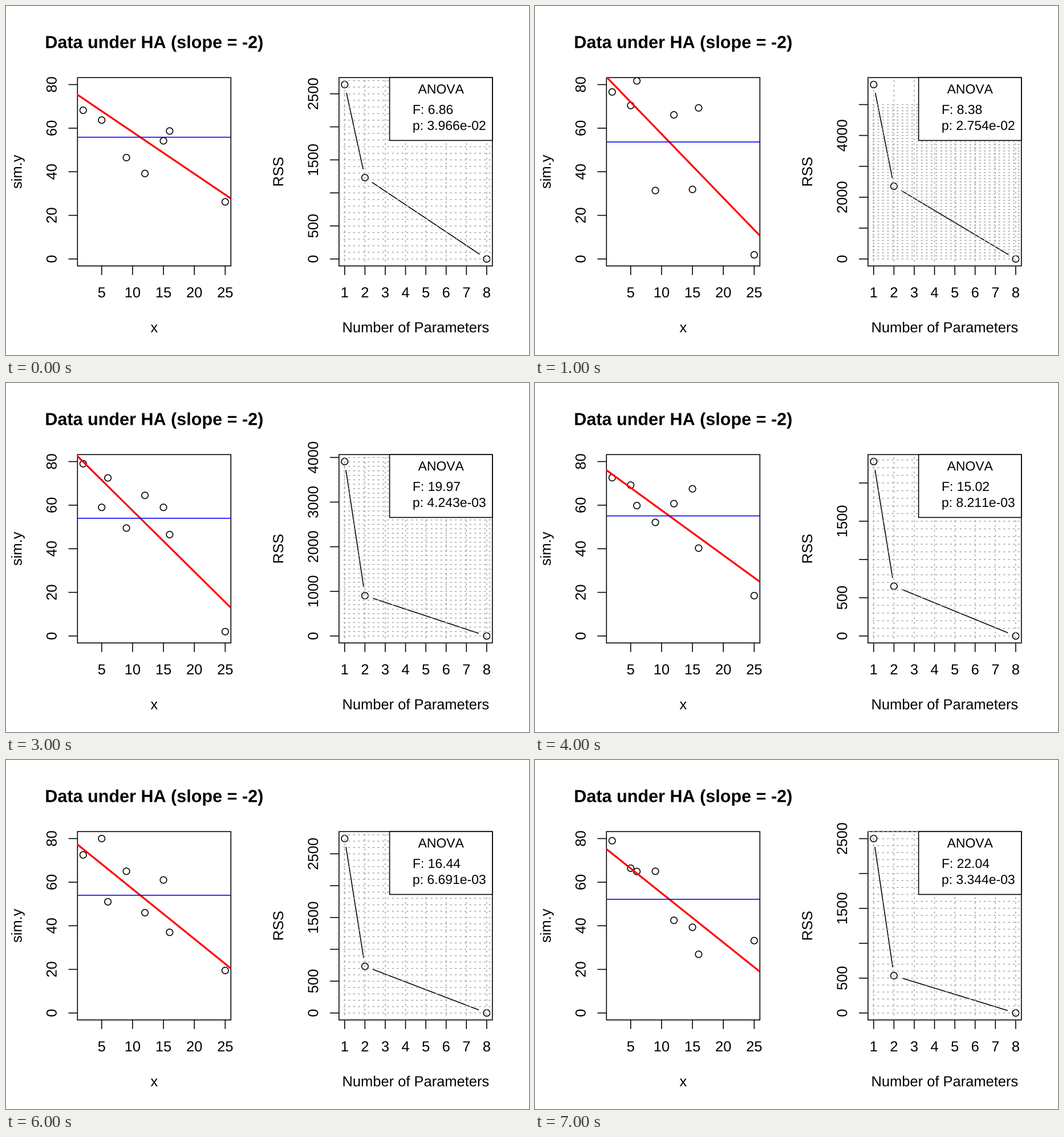
Animation, 917 px wide and 611 px high, one loop 8 s. Source, as a matplotlib script:

```python
import numpy as np
import matplotlib.pyplot as plt
from matplotlib.animation import FuncAnimation
from matplotlib.patches import Circle, PathPatch, Rectangle
from matplotlib.path import Path
from matplotlib.textpath import TextPath
from matplotlib.transforms import Affine2D

W, H, DPI = 917, 611, 100
PT = 72 / DPI              # points per pixel
INCH = W / 6               # plot inch in pixels
LINE = 0.2 * INCH          # height of a margin line
FONT = INCH / 6
LWD = INCH / 96
GREY = "#a9a9a9"

plt.rcParams["path.snap"] = False

TOP, BOTTOM = 4.1 * LINE, H - 5.1 * LINE
XS = np.array([2, 5, 6, 9, 12, 15, 16, 25])
SXX = ((XS - XS.mean()) ** 2).sum()

# simulated y values, total RSS, F, p
RUNS = [
    ([68.2, 63.7, 90.1, 46.5, 39.2, 54.2, 58.7, 26.2], 2640, "6.86", "3.966e-02"),
    ([76.6, 70.4, 81.7, 31.4, 66.1, 31.9, 69.3, 1.9], 5648, "8.38", "2.754e-02"),
    ([86.0, 65.9, 68.0, 56.2, 35.0, 33.8, 53.1, 26.0], 2881, "20.42", "4.020e-03"),
    ([79.0, 59.0, 72.5, 49.5, 64.5, 59.0, 46.5, 2.0], 3908, "19.97", "4.243e-03"),
    ([72.6, 69.2, 59.8, 52.1, 60.7, 67.5, 40.3, 18.5], 2280, "15.02", "8.211e-03"),
    ([92.9, 53.3, 56.8, 68.5, 58.0, 60.8, 33.7, 12.9], 3899, "15.32", "7.851e-03"),
    ([72.5, 80.0, 51.0, 65.0, 46.0, 61.0, 37.0, 19.5], 2740, "16.44", "6.691e-03"),
    ([79.0, 66.4, 64.9, 65.0, 42.5, 39.3, 26.9, 33.2], 2501, "22.04", "3.344e-03"),
]

fig = plt.figure(figsize=(W / DPI, H / DPI), dpi=DPI, facecolor="white")
ax = fig.add_axes([0, 0, 1, 1])
glyphs = {}


def glyph(ch, weight):
    """Outline and advance width of a character, in ems."""
    if (ch, weight) not in glyphs:
        def outline(s):
            return TextPath((0, 0), s, size=1,
                            prop={"family": "Liberation Sans", "weight": weight})
        advance = outline(ch + "|").get_extents().x1 - outline("|").get_extents().x1
        glyphs[ch, weight] = (None if ch == " " else outline(ch)), advance
    return glyphs[ch, weight]


def label(x, y, s, size=1.0, align=0.5, rotation=0, weight="normal"):
    """Unkerned text on its baseline, at fractional pixel positions."""
    parts, width = [], 0
    for ch in s:
        outline, advance = glyph(ch, weight)
        if outline is not None:
            parts.append(Affine2D().translate(width, 0).transform_path(outline))
        width += advance
    px = size * FONT
    place = (Affine2D().translate(-align * width, 0).rotate_deg(rotation)
             .scale(px, -px).translate(x, y))
    path = place.transform_path(Path.make_compound_path(*parts))
    ax.add_patch(PathPatch(path, fc="black", lw=0, zorder=1))


def seg(x, y, color="black", lwd=1, clip=None, **kw):
    kw.setdefault("solid_capstyle", "round")
    line, = ax.plot(x, y, color=color, lw=lwd * LWD * PT, zorder=1, **kw)
    if clip is not None:
        line.set_clip_path(clip)


class Panel:
    """Plot region whose axes extend 4% beyond the data ranges."""

    def __init__(self, offset, xlim, ymax):
        self.left = offset + 4.1 * LINE
        self.right = offset + W / 2 - 2.1 * LINE
        self.x0 = xlim[0]
        self.sx = (self.right - self.left) / 1.08 / (xlim[1] - xlim[0])
        self.sy = (BOTTOM - TOP) / 1.08 / ymax
        self.box = Rectangle((self.left, TOP), self.right - self.left, BOTTOM - TOP,
                             fill=False, lw=LWD * PT, ec="black", zorder=1)
        ax.add_patch(self.box)

    def px(self, x):
        return self.left + 0.04 / 1.08 * (self.right - self.left) + (x - self.x0) * self.sx

    def py(self, y):
        return BOTTOM - 0.04 / 1.08 * (BOTTOM - TOP) - y * self.sy

    def points(self, xs, ys):
        for x, y in zip(xs, ys):
            dot = Circle((self.px(x), self.py(y)), 0.0375 * INCH, fill=False,
                         ec="black", lw=LWD * PT, zorder=1)
            ax.add_patch(dot)
            dot.set_clip_path(self.box)

    def x_axis(self, ticks, title):
        for t in ticks:
            x = self.px(t)
            seg([x, x], [BOTTOM, BOTTOM + LINE / 2])
            label(x, BOTTOM + 1.8 * LINE, str(t))
        label((self.left + self.right) / 2, BOTTOM + 3.8 * LINE, title)

    def y_axis(self, ticks, title):
        end = -np.inf
        for t in ticks:
            y = self.py(t)
            seg([self.left - LINE / 2, self.left], [y, y])
            # labels that come too close to the previous one are skipped
            half = 0.278 * FONT * len(str(t))
            pos = t * self.sy
            if pos - half >= end + 0.833 * FONT:
                label(self.left - 1.2 * LINE, y, str(t), rotation=90)
                end = pos + half
        label(self.left - 3.2 * LINE, (TOP + BOTTOM) / 2, title, rotation=90)

    def grid(self, xs, ys):
        # dots measure 1 pt, gaps 3 pt, on a 0.75 pt line
        dots = dict(color=GREY, clip=self.box, linestyle=(0, (4 / 3, 4)),
                    dash_capstyle="round")
        for y in self.py(ys):
            if y > TOP - 2:
                seg([self.left, self.right], [y, y], **dots)
        for x in self.px(xs):
            seg([x, x], [BOTTOM, TOP], **dots)


def data_panel(ys, slope):
    p = Panel(0, (2, 25), 80)
    p.points(XS, ys)
    p.x_axis(range(5, 26, 5), "x")
    p.y_axis(range(0, 81, 20), "sim.y")
    label((p.left + p.right) / 2, TOP / 2 + 11, "Data under HA (slope = -2)",
          size=1.2, weight="bold")
    mean = np.mean(ys)
    ends = np.array([0, 28])
    fit = mean + slope * (ends - XS.mean())
    seg(p.px(ends), p.py(fit), "red", 2, p.box)
    seg([p.left, p.right], [p.py(mean)] * 2, "blue", 1, p.box)


def rss_panel(rss, f, pval):
    p = Panel(W / 2, (1, 8), rss[0])
    params = np.array([1, 2, 8])
    pts = np.column_stack([p.px(params), p.py(np.array(rss))])
    for a, b in zip(pts, pts[1:]):
        gap = (b - a) / np.hypot(*(b - a)) * LINE / 2
        seg(*zip(a + gap, b - gap))
    p.points(params, rss)
    p.x_axis(range(1, 9), "Number of Parameters")
    step = 500 if rss[0] < 3000 else 1000
    p.y_axis(range(0, int(rss[0] * 1.04) + 1, step), "RSS")
    p.grid(np.arange(1, 9), np.arange(0, 5001, 100))

    left, base = 672.6, 235.4
    ax.add_patch(Rectangle((left, TOP), p.right - left, base - TOP, fc="white",
                           ec="black", lw=LWD * PT, zorder=1))
    label((left + p.right) / 2, 153.2, "ANOVA", 0.9)
    label(712.9, 189, "F: " + f, 0.9, align=0)
    label(712.9, 217, "p: " + pval, 0.9, align=0)


def draw(i):
    ax.clear()
    ax.axis("off")
    ys, total, f, pval = RUNS[i]
    resid = total / (1 + float(f) / 6)
    data_panel(ys, -np.sqrt((total - resid) / SXX))
    rss_panel([total, resid, 0], f, pval)
    ax.set(xlim=(0, W), ylim=(H, 0))
    return []


anim = FuncAnimation(fig, draw, frames=len(RUNS), interval=1000,
                     repeat=True, repeat_delay=0)
plt.show()
```
